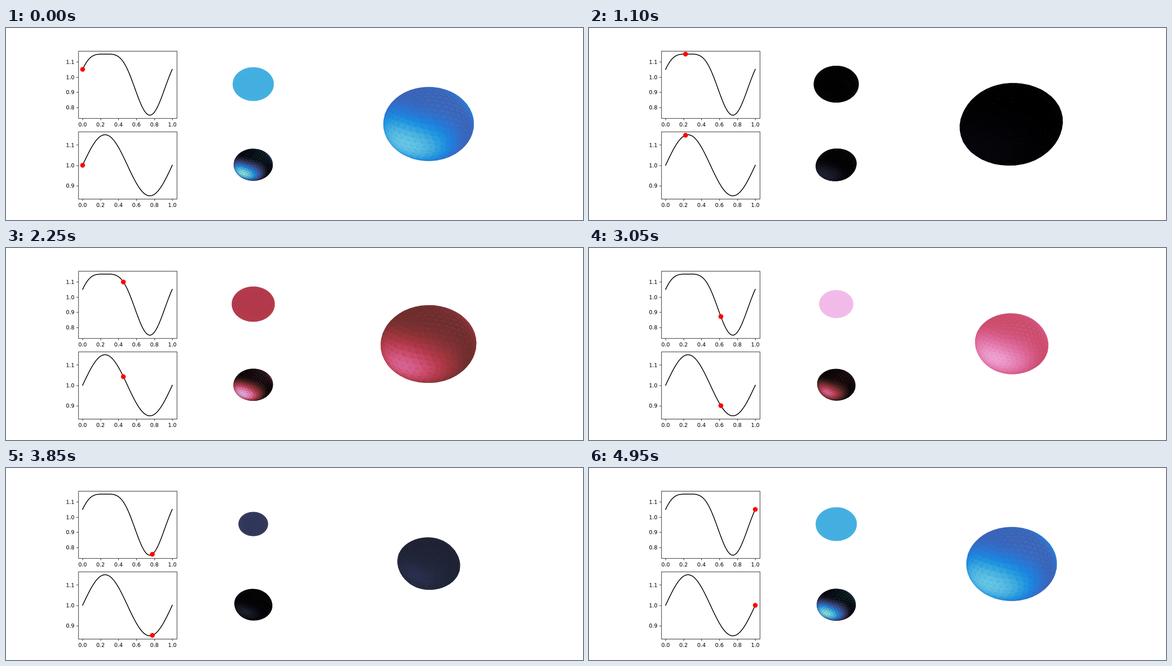
An HTML page with a canvas for the animation above (5 s loop, 1280x427 px).

```html
<!DOCTYPE html>
<html>
<head>
<meta charset="utf-8">
<style>
html, body { margin: 0; width: 100%; height: 100%; overflow: hidden; background: #fff; }
canvas { display: block; }
</style>
</head>
<body>
<canvas id="stage" width="1280" height="427"></canvas>
<script>
const ctx = document.getElementById('stage').getContext('2d');
const TAU = 2 * Math.PI, STEPS = 100, STEP_MS = 50;

// Radius curves and their velocities over one cycle
const radial = p => 1 + 0.2 * Math.sin(TAU * p) + 0.05 * Math.cos(2 * TAU * p);
const radialSpeed = p => TAU * (0.2 * Math.cos(TAU * p) - 0.1 * Math.sin(2 * TAU * p));
const mode = p => 1 + 0.15 * Math.sin(TAU * p);
const modeSpeed = p => TAU * 0.15 * Math.cos(TAU * p);

// Strength of the mode over the sphere: sin^4(theta) sin^2(phi)
const pattern = ([, y, z]) => y * y * (1 - z * z);

// Colour stops by normalised speed: approaching is blue, receding is red
const BLUE = [[0, '000000'], [.066, '05050b'], [.174, '1d2132'], [.265, '2e3557'], [.39, '3b4b8d'],
  [.5075, '3b62b6'], [.56, '2d72cf'], [.62, '1d83de'], [.69, '2099e0'], [.77, '42aee0'],
  [.89, '68cbe6'], [.942, '80dfe9'], [1, '98eeee']];
const RED = [[0, '000000'], [.07, '0b0505'], [.175, '2b1514'], [.35, '6c2d2c'], [.44, '913438'],
  [.53, 'b23849'], [.63, 'cb4a6a'], [.715, 'dc6597'], [.914, 'f0a6d9'], [.956, 'f1bae9'], [1, 'f3cbf2']];
const channels = hex => [0, 2, 4].map(i => parseInt(hex.slice(i, i + 2), 16));

function colour(speed) {
  const stops = speed < 0 ? RED : BLUE, t = Math.min(1, Math.abs(speed));
  let i = 1;
  while (i < stops.length - 1 && stops[i][0] < t) i++;
  const [t0, c0] = stops[i - 1], [t1, c1] = stops[i];
  const a = channels(c0), b = channels(c1), k = (t - t0) / (t1 - t0);
  return `rgb(${a.map((v, j) => Math.round(v + (b[j] - v) * k))})`;
}

// Icosahedron, each face split in four three times
const points = [], faces = [];
function buildSphere() {
  const g = (1 + Math.sqrt(5)) / 2, cache = {};
  const add = v => points.push(v.map(c => c / Math.hypot(...v))) - 1;
  for (const s of [[0, 1, 2], [2, 0, 1], [1, 2, 0]])
    for (const a of [-1, 1])
      for (const b of [-g, g]) add(s.map(i => [a, b, 0][i]));
  const middle = (a, b) => {
    const key = Math.min(a, b) + '_' + Math.max(a, b);
    return cache[key] ??= add(points[a].map((c, i) => c + points[b][i]));
  };
  const split = (a, b, c, depth) => {
    if (!depth) return faces.push([a, b, c]);
    const d = middle(a, b), e = middle(b, c), f = middle(c, a);
    for (const t of [[a, d, f], [d, b, e], [f, e, c], [d, e, f]]) split(...t, depth - 1);
  };
  const dot = (a, b) => points[a].reduce((sum, c, i) => sum + c * points[b][i], 0);
  for (let a = 0; a < 12; a++)
    for (let b = a + 1; b < 12; b++)
      for (let c = b + 1; c < 12; c++)
        if (dot(a, b) > .4 && dot(b, c) > .4 && dot(a, c) > .4) split(a, b, c, 3);
}
buildSphere();

// View from 30 degrees up and 60 degrees to the side, with a flattened z axis
function project([x, y, z], cx, cy, unit) {
  z *= 0.75;
  const depth = 0.433 * x - 0.75 * y + 0.5 * z;
  const scale = unit / (1 - 0.055 * depth);
  return [cx + scale * (0.866 * x + 0.5 * y), cy - scale * (-0.25 * x + 0.433 * y + 0.866 * z), depth];
}

function ball(cx, cy, unit, radius, stretch, speed, modeRate, top) {
  const dots = points.map(v => {
    const r = radius + stretch * pattern(v);
    return project(v.map(c => c * r), cx, cy, unit);
  });
  const speeds = points.map(v => (speed + modeRate * pattern(v)) / top);
  const depth = f => f.reduce((sum, i) => sum + dots[i][2], 0);
  const order = faces.map(f => [depth(f), f]).sort((a, b) => a[0] - b[0]);
  for (const [, f] of order) {
    ctx.fillStyle = colour((speeds[f[0]] + speeds[f[1]] + speeds[f[2]]) / 3);
    ctx.beginPath();
    for (const i of f) ctx.lineTo(dots[i][0], dots[i][1]);
    ctx.fill();
  }
}

function line(x0, y0, x1, y1) {
  ctx.beginPath();
  ctx.moveTo(x0, y0);
  ctx.lineTo(x1, y1);
  ctx.stroke();
}

// Plots are laid out on a 1500 by 500 figure; 5% margins around the data
function plot(top, curve, low, high, ticks, p) {
  const left = 187.5, width = 256.4, height = 175, bottom = top + height;
  const unit = height / 1.1 / (high - low);
  const px = x => left + width * (x + 0.05) / 1.1;
  const py = y => top + height / 2 - (y - (low + high) / 2) * unit;
  const snap = v => Math.floor(v + 0.5) + 0.5;
  ctx.save();
  ctx.scale(1280 / 1500, 427 / 500);
  ctx.strokeStyle = ctx.fillStyle = '#000';
  ctx.lineWidth = 1.11;
  ctx.font = '13.89px "DejaVu Sans", sans-serif';
  ctx.strokeRect(snap(left), snap(top), snap(left + width) - snap(left), height);
  ctx.textAlign = 'center';
  for (let i = 0; i <= 5; i++) {
    const x = px(i / 5);
    line(snap(x), bottom + 0.5, snap(x), bottom + 5.4);
    ctx.fillText((i / 5).toFixed(1), x, bottom + 21);
  }
  ctx.textAlign = 'right';
  for (const v of ticks) {
    const y = py(v);
    line(left - 4.4, snap(y), left + 0.5, snap(y));
    ctx.fillText(v.toFixed(1), left - 9.7, y + 5.3);
  }
  ctx.lineWidth = 2.08;
  ctx.lineJoin = 'round';
  ctx.lineCap = 'square';
  ctx.beginPath();
  for (let i = 0; i < STEPS; i++) ctx.lineTo(px(i / 99), py(curve(i / 99)));
  ctx.stroke();
  ctx.fillStyle = '#f00';
  ctx.beginPath();
  ctx.arc(px(p), py(curve(p)), 6.25, 0, TAU);
  ctx.fill();
  ctx.restore();
}

function draw(p) {
  ctx.fillStyle = '#fff';
  ctx.fillRect(0, 0, 1280, 427);
  plot(60, radial, 0.75, 1.15, [0.8, 0.9, 1, 1.1], p);
  plot(270, mode, 0.85, 1.15, [0.9, 1, 1.1], p);
  const r = radial(p), s = mode(p) - 1, v = radialSpeed(p), w = modeSpeed(p);
  ball(548.5, 124.3, 43.5, r, 0, v, 0, 1.632);
  ball(548.5, 303.7, 43.5, 1, s, 0, w, 0.9425);
  ball(937.5, 212.3, 95.7, r, s, v, w, 2.476);
}

let shown = -1;
function tick(now) {
  const step = Math.floor(now / STEP_MS) % STEPS;
  if (step !== shown) draw((shown = step) / (STEPS - 1));
  requestAnimationFrame(tick);
}
tick(performance.now());
</script>
</body>
</html>
```
